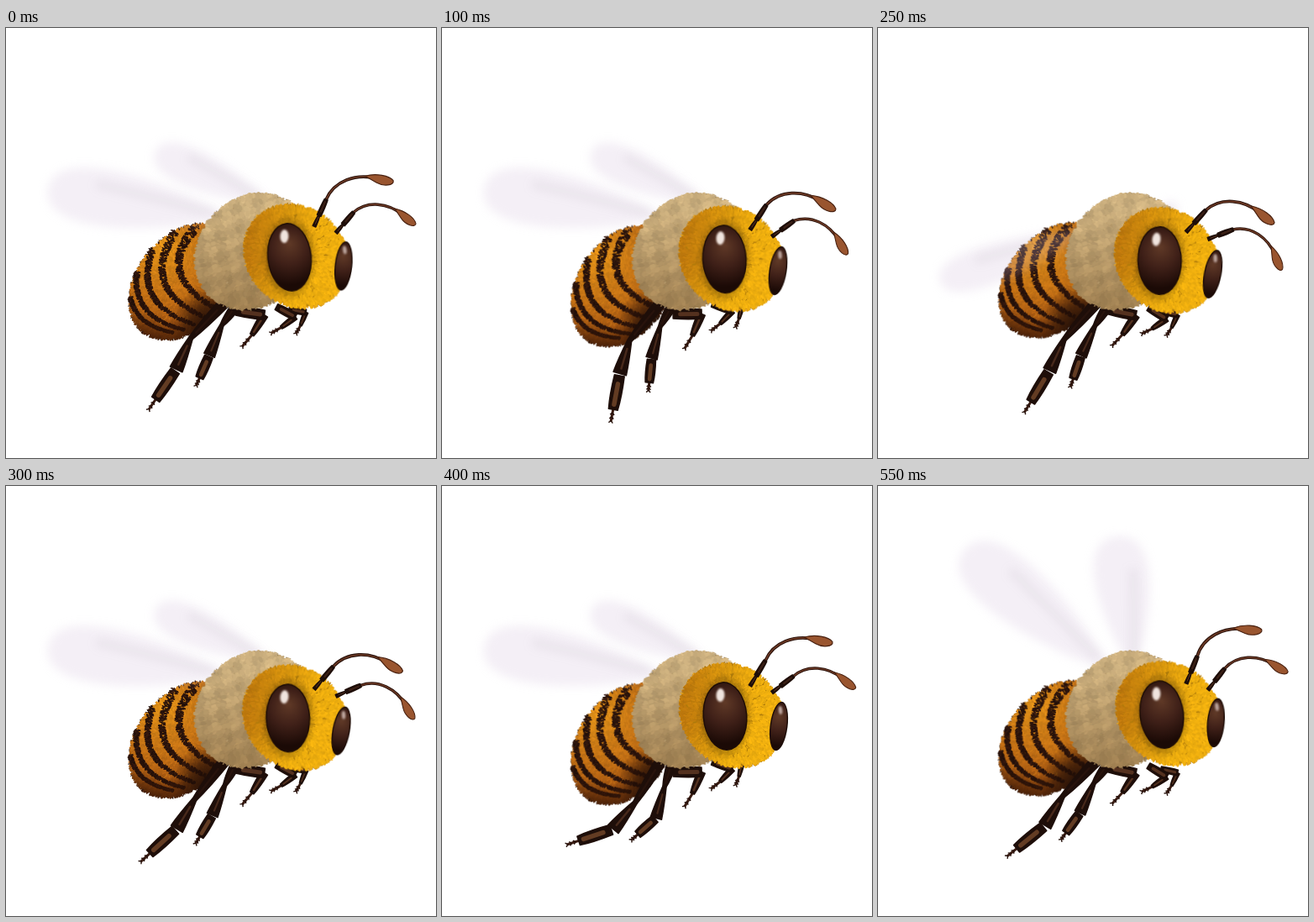
Recreate the animation shown at these times as an HTML page with a canvas. Size 512 by 512 pixels, loop 0.6 s.

```html
<!DOCTYPE html>
<html>
<head>
<meta charset="utf-8">
<title>Flying bee</title>
<style>
  html, body { margin: 0; width: 100%; height: 100%; overflow: hidden; background: #fff; }
  canvas { display: block; width: 100vmin; height: 100vmin; }
</style>
</head>
<body>
<canvas id="stage" width="512" height="512"></canvas>
<script>
const ctx = document.getElementById('stage').getContext('2d');
const RAD = Math.PI / 180;
const STEP_MS = 50, STEPS = 12;

let seed = 11;
const rnd = () => (seed = seed * 16807 % 2147483647) / 2147483647;
const spread = a => (rnd() * 2 - 1) * a;
const clamp = v => Math.max(0, Math.min(1, v));
const at = ([x, y], deg, len) => [x + len * Math.cos(deg * RAD), y + len * Math.sin(deg * RAD)];
const lerp = (a, b, t) => a.map((v, i) => v + (b[i] - v) * t);
const rgb = (color, k = 1) => `rgb(${color.map(v => v * k | 0)})`;

// Every furry body part is a tilted ellipse; local units run from 0 at the centre to 1 at the rim
const place = (part, deg, r) => {
  const u = part.a * r * Math.cos(deg * RAD), v = part.b * r * Math.sin(deg * RAD);
  return at(at([part.x, part.y], part.tilt, u), part.tilt + 90, v);
};

function layer(paint) {
  const canvas = document.createElement('canvas');
  canvas.width = canvas.height = 512;
  const g = canvas.getContext('2d');
  g.lineCap = 'round';
  paint(g);
  return canvas;
}

function hair(g, [x, y], dir, len, width, color) {
  g.strokeStyle = color;
  g.lineWidth = width;
  g.beginPath();
  g.moveTo(x, y);
  g.lineTo(x + Math.cos(dir) * len, y + Math.sin(dir) * len);
  g.stroke();
}

function ellipse(g, x, y, rx, ry, tilt, fill) {
  g.fillStyle = fill;
  g.beginPath();
  g.ellipse(x, y, rx, ry, tilt, 0, 7);
  g.fill();
}

// Hairs combed outward, between an inner radius and the rim
function fur(g, part, inner, count, len, width, color) {
  for (let i = 0; i < count; i++) {
    const p = place(part, rnd() * 360, Math.sqrt(inner * inner + rnd() * (1 - inner * inner)));
    const dir = Math.atan2(p[1] - part.y, p[0] - part.x) + spread(.6);
    hair(g, p, dir, len * (.5 + rnd() * .5), width, color(...p));
  }
}

function coat(g, part, fringe, color) {
  fur(g, part, .93, 900, 4, 1.1, () => rgb(fringe, 1 + spread(.25)));
  ellipse(g, part.x, part.y, part.a, part.b, part.tilt * RAD, color(part.x, part.y));
  fur(g, part, 0, 5000, 3, 2.2, color);
}

const abdomen = layer(g => {
  const part = { x: 212, y: 302, a: 76, b: 53, tilt: 130 };
  const axis = (u, v) => at(at([part.x, part.y], part.tilt, u), part.tilt + 90, v);
  coat(g, part, [52, 24, 10], (x, y) => {
    const depth = clamp(Math.hypot(x - 185, y - 262) / 110);
    return rgb(lerp([228, 148, 26], [160, 78, 18], depth), 1 + spread(.08));
  });
  for (let i = 0; i < 5; i++) {
    const start = place(part, 146 - 25.5 * i, 1), end = place(part, -90 + 13 * i, .9);
    const bend = axis(76 - 62 * (1 - i / 4) ** 2, 36 - 1.6 * i * i);
    for (let n = 0; n < 500; n++) {
      const t = rnd(), p = lerp(start, bend, t), q = lerp(bend, end, t);
      const across = Math.atan2(q[1] - p[1], q[0] - p[0]) + Math.PI / 2;
      const off = spread((10.5 - 1.5 * i) * (1 - .6 * t) / 2);
      const [x, y] = lerp(p, q, t);
      hair(g, [x + Math.cos(across) * off, y + Math.sin(across) * off], across + spread(.5), 1.6, 1.5,
        rgb([42, 20, 13], 1 + spread(.3)));
    }
  }
  g.globalCompositeOperation = 'source-atop';
  const shadow = g.createRadialGradient(250, 362, 10, 250, 362, 58);
  shadow.addColorStop(0, '#1c0c06');
  shadow.addColorStop(.5, 'rgba(35,14,6,.7)');
  shadow.addColorStop(1, 'rgba(60,25,5,0)');
  g.fillStyle = shadow;
  g.fillRect(0, 0, 512, 512);
  const base = g.createLinearGradient(178, 340, 170, 368);
  base.addColorStop(0, 'rgba(50,20,5,0)');
  base.addColorStop(1, 'rgba(50,20,5,.8)');
  g.fillStyle = base;
  g.fillRect(0, 0, 512, 512);
});

const thorax = layer(g => {
  const part = { x: 295, y: 266, a: 72, b: 62, tilt: -45 };
  const color = (x, y) => {
    const patch = Math.sin(x / 6 + y / 10) * Math.sin(y / 7 - x / 12);
    return rgb(lerp([205, 177, 128], [152, 121, 76], clamp((y - 215) / 130)), 1 + .07 * patch + spread(.05));
  };
  coat(g, part, [164, 136, 90], color);
  fur(g, part, 0, 900, 3, 4.5, color);
});

const head = layer(g => {
  const part = { x: 345, y: 273, a: 64, b: 56, tilt: 45 };
  coat(g, part, [205, 140, 14], (x, y) => {
    const ring = Math.hypot((x - 337) / 26, (y - 274) / 41);
    const light = clamp((x - 290) / 85 + Math.max(0, y - 280) / 120);
    return rgb(lerp([190, 121, 14], [240, 176, 16], light), .75 + .25 * clamp((ring - .95) / .3) + spread(.06));
  });
  const eye = (x, y, rx, ry, tilt) => {
    ellipse(g, x, y, rx, ry, tilt, '#1d0c06');
    const glow = g.createRadialGradient(x, y - ry * .4, 1, x, y - ry * .2, ry);
    glow.addColorStop(0, '#5e3826');
    glow.addColorStop(.5, '#3f2018');
    glow.addColorStop(1, '#1b0a06');
    ellipse(g, x, y, rx - 1.5, ry - 1.5, tilt, glow);
  };
  eye(337, 274, 26.5, 41, -.08);
  eye(401, 286, 10.5, 29.5, .13);
  g.filter = 'blur(1px)';
  ellipse(g, 331.5, 249, 5, 8, .05, '#f0e4de');
  ellipse(g, 403, 267, 2.3, 5, -.1, '#bfa8a0');
});

function limb(a, b, wa, wb, sheen = '#6b402a') {
  const dir = Math.atan2(b[1] - a[1], b[0] - a[0]), len = Math.hypot(b[0] - a[0], b[1] - a[1]);
  const bulge = (wa + wb) * .32;
  ctx.save();
  ctx.translate(...a);
  ctx.rotate(dir);
  ctx.fillStyle = ctx.strokeStyle = '#1e0e09';
  ctx.lineWidth = 1.5;
  ctx.lineJoin = ctx.lineCap = 'round';
  ctx.beginPath();
  ctx.moveTo(0, wa / 2);
  ctx.quadraticCurveTo(len * .6, bulge, len, wb / 2);
  ctx.lineTo(len, -wb / 2);
  ctx.quadraticCurveTo(len * .6, -bulge, 0, -wa / 2);
  ctx.closePath();
  ctx.fill();
  ctx.stroke();
  ctx.globalAlpha = .7;
  hair(ctx, [len * .25, 0], 0, len * .6, Math.min(wa, wb) * .5, sheen);
  ctx.restore();
}

function claw(a, b) {
  const dir = Math.atan2(b[1] - a[1], b[0] - a[0]), len = Math.hypot(b[0] - a[0], b[1] - a[1]);
  hair(ctx, a, dir, len, 3, '#3a1c12');
  for (let t = .35; t < 1.1; t += .3) {
    for (const side of [-.8, .8]) hair(ctx, lerp(a, b, t), dir + side, 3.5, 1.4, '#26110b');
  }
}

// Blade from its root to its rounded tip
function wing(root, tip, half) {
  const len = Math.hypot(tip[0] - root[0], tip[1] - root[1]);
  ctx.save();
  ctx.translate(...root);
  ctx.rotate(Math.atan2(tip[1] - root[1], tip[0] - root[0]));
  ctx.filter = 'blur(6px)';
  ctx.fillStyle = 'rgba(205,186,214,.23)';
  ctx.beginPath();
  ctx.moveTo(0, 0);
  ctx.bezierCurveTo(len * .45, -half, len, -half * 1.4, len, 0);
  ctx.bezierCurveTo(len, half * 1.4, len * .45, half, 0, 0);
  ctx.fill();
  ctx.strokeStyle = 'rgba(150,140,145,.1)';
  ctx.lineWidth = 10;
  ctx.beginPath();
  ctx.moveTo(len * .1, half * .05);
  ctx.quadraticCurveTo(len * .5, half * .3, len * .75, half * .4);
  ctx.stroke();
  ctx.restore();
}

const wingPoses = {
  mid: [[[270, 226], [50, 192], 37], [[318, 210], [178, 147], 25]],
  low: [[[255, 240], [74, 302], 26], [[330, 225], [356, 210], 9]],
  up: [[[280, 222], [103, 76], 40], [[305, 222], [284, 60], 36]]
};
const wingCycle = ['mid', 'low', 'mid', 'up'];

function hindLeg(hip, femur, tibia, tarsus, size, [femurLen, tibiaLen, tarsusLen]) {
  const knee = at(hip, femur, femurLen), ankle = at(knee, tibia, tibiaLen), toe = at(ankle, tarsus, tarsusLen);
  limb(hip, knee, 13 * size, 5 * size, '#2c160e');
  claw(lerp(ankle, toe, .72), toe);
  limb(lerp(ankle, toe, .04), lerp(ankle, toe, .75), 12 * size, 11 * size, '#80502f');
  limb(knee, ankle, 5 * size, 16 * size, '#5a3524');
}

function frontLeg(shoulder, thigh, shin, size) {
  const knee = at(shoulder, thigh, 34 * size), ankle = at(knee, shin, 28 * size);
  claw(ankle, at(ankle, shin + 8, 18 * size));
  limb(knee, ankle, 9 * size, 5 * size);
  limb(shoulder, knee, 10 * size, 11 * size);
}

function antenna(base, scape, flagellum, scapeLen, size) {
  const elbow = at(base, scape, scapeLen);
  ctx.save();
  ctx.translate(...elbow);
  ctx.rotate(flagellum * RAD);
  ctx.scale(size, size);
  ctx.lineCap = 'round';
  for (const [color, width] of [['#2b130c', 3.8], ['#6e3a25', 1.6]]) {
    ctx.strokeStyle = color;
    ctx.lineWidth = width;
    ctx.beginPath();
    ctx.moveTo(0, 0);
    ctx.bezierCurveTo(15, -19, 42, -21, 64, -9);
    ctx.stroke();
  }
  ctx.beginPath();
  ctx.moveTo(52, -15);
  ctx.bezierCurveTo(66, -15, 80, -8, 83, -1);
  ctx.bezierCurveTo(83, 5, 70, 3, 63, -4);
  ctx.closePath();
  ctx.fillStyle = '#99552f';
  ctx.strokeStyle = '#48200f';
  ctx.lineWidth = 1.2;
  ctx.fill();
  ctx.stroke();
  ctx.restore();
  limb(base, lerp(base, elbow, .4), 4, 2);
  limb(lerp(base, elbow, .4), elbow, 5, 4, '#4a291c');
}

function turned(x, y, deg, paint) {
  ctx.save();
  ctx.translate(x, y);
  ctx.rotate(deg * RAD);
  ctx.translate(-x, -y);
  paint();
  ctx.restore();
}

function draw(step) {
  // Swings once, or twice, per loop with its maximum at the given step
  const once = peak => Math.cos((step - peak) * 30 * RAD);
  const twice = peak => Math.cos((step - peak) * 60 * RAD);
  const sway = twice(2), nod = once(4.5);
  const thigh = 4 * once(1.5) + 3.5 * twice(5);

  ctx.fillStyle = '#fff';
  ctx.fillRect(0, 0, 512, 512);
  turned(255, 270, -5 * (sway + .5), () => ctx.drawImage(abdomen, 0, 0));
  for (const blade of wingPoses[wingCycle[step % 4]]) wing(...blade);
  hindLeg([273, 332], 119 + 1.6 * thigh, 110 + 5 * twice(5), 117 + 23 * once(8.7), .85, [27, 39, 39]);
  hindLeg([262, 325], 129 + thigh, 118 - 12 * once(2.5), 131 + 32 * once(8.6), 1, [61, 41, 58]);
  turned(300, 332, -6 * (sway + .5), () => {
    frontLeg([337, 335], 10, 112, .6);
    frontLeg([322, 332], 28, 143, .75);
    frontLeg([274, 337], 8, 122, 1);
  });
  ctx.drawImage(thorax, 1.5 * sway, 0);
  turned(290, 250, 3 * (nod + .26), () => ctx.drawImage(head, 0, 0));
  antenna([367, 239 + 4 * nod], -58 + 10 * once(4.8), -5.5 + 19 * once(4), 35, 1);
  antenna([393, 247 + 4.5 * nod], -36.5 + 15.5 * once(4.9), 21.5 + 21 * once(4), 32, .91);
}

let shown = -1;
function tick() {
  const step = Math.floor(performance.now() / STEP_MS) % STEPS;
  if (step !== shown) draw(shown = step);
  requestAnimationFrame(tick);
}
tick();
</script>
</body>
</html>
```
